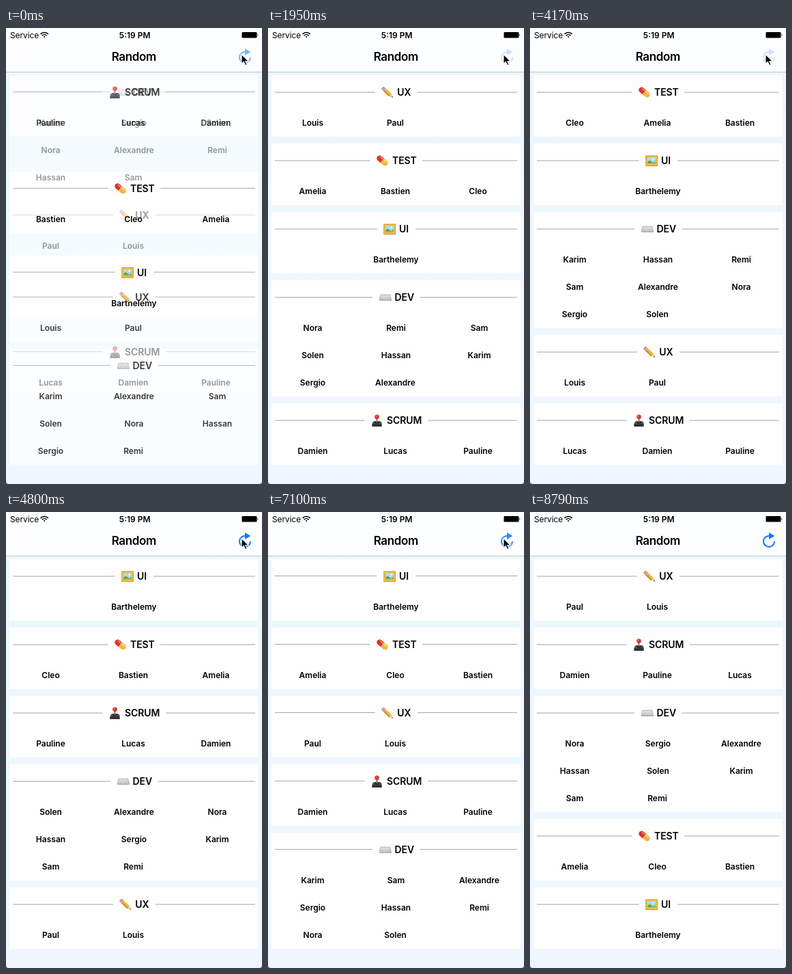
Write an HTML page that moves like this. It is 375 px wide and 667 px high and loops after 8890 ms.

```html
<!DOCTYPE html>
<html lang="en">
<head>
<meta charset="utf-8">
<title>Random</title>
<style>
  html, body { margin: 0; width: 100%; height: 100%; overflow: hidden; background: #edf7fd; }
  svg { display: block; width: 375px; height: 667px; font-family: Inter, Roboto, sans-serif; font-weight: 600; }
  .name { font-size: 12px; text-anchor: middle; }
  .head { font-size: 14px; letter-spacing: -.1px; }
</style>
</head>
<body>
<svg viewBox="0 0 375 667">
  <defs>
    <linearGradient id="sky" x2="0" y2="1">
      <stop stop-color="#ebf7fc"/><stop offset="1" stop-color="#eff6ff"/>
    </linearGradient>
    <linearGradient id="keys" x2="0" y2="1">
      <stop stop-color="#d9d9d9"/><stop offset="1" stop-color="#a9a9a9"/>
    </linearGradient>
    <g id="icon-S">
      <path d="M2 12 4 10H13L15.5 12V18H1.5Z" fill="#4b4d50"/>
      <path d="M1.5 14H15.5V18H1.5Z" fill="#2f3134"/>
      <ellipse cx="8.5" cy="12" rx="3.4" ry="1.4" fill="#222"/>
      <path d="M8.5 4V12" stroke="#777" stroke-width="2"/>
      <circle cx="8.5" cy="3.7" r="3.3" fill="#d8342c"/>
      <circle cx="7.5" cy="2.7" r="1" fill="#f08a80"/>
      <circle cx="4" cy="12" r="1" fill="#d8342c"/>
    </g>
    <g id="icon-T" transform="rotate(40 8.5 9)">
      <path d="M8.5 4.8H3.2A4.2 4.2 0 0 0 3.2 13.2H8.5Z" fill="#d9362b"/>
      <path d="M8.5 4.8H13.8A4.2 4.2 0 0 1 13.8 13.2H8.5Z" fill="#f4b53c"/>
      <path d="M2.5 6.8H8" stroke="#f39a8c" stroke-width="1.4" stroke-linecap="round"/>
      <path d="M9.5 6.8H14" stroke="#fde39a" stroke-width="1.4" stroke-linecap="round"/>
    </g>
    <g id="icon-I">
      <rect x=".3" y="1.5" width="17.6" height="15.6" fill="#c98e22"/>
      <rect x="1.3" y="2.5" width="15.6" height="13.6" fill="#efc14d"/>
      <rect x="3.4" y="4.6" width="11.4" height="9.4" fill="#a9dcf2"/>
      <path d="M3.4 10.5Q6 7.5 9 10.4T14.8 9.6V14H3.4Z" fill="#5f9f45"/>
      <path d="M3.4 12.4 14.8 11.6V14H3.4Z" fill="#9fb95b"/>
      <circle cx="11.5" cy="6.6" r="1.2" fill="#fff"/>
    </g>
    <g id="icon-X" transform="translate(1.4 2.4) rotate(43)">
      <path d="M0-2.6H2.5V2.6H0Q-1.3 0 0-2.6Z" fill="#e58f8d"/>
      <path d="M2.3-2.6H4.4V2.6H2.3Z" fill="#a9adb0"/>
      <path d="M4.4-2.6H16V2.6H4.4Z" fill="#f2b635"/>
      <path d="M4.4.9H16V2.6H4.4Z" fill="#c98322"/>
      <path d="M16-2.6 21 0 16 2.6Z" fill="#efcf9e"/>
      <path d="M19-1 21.2 0 19 1Z" fill="#333"/>
    </g>
    <g id="icon-D">
      <path d="M2.5 5H16.3L18.3 13.5H.5Z" fill="url(#keys)" stroke="#a2a2a2" stroke-width=".6"/>
      <path d="M3.2 7H15.7M2.7 9H16.3M2.3 11.3H4.3M5.5 11.3H13M14.3 11.3H16.8" stroke="#f3f3f3" stroke-width="1.1" stroke-dasharray="1.6 .5"/>
    </g>
  </defs>
  <rect width="375" height="667" fill="url(#sky)"/>
  <g id="list"></g>
  <rect width="375" height="64" fill="#fbfdff"/>
  <rect y="64" width="375" height="1" fill="#c0c7cc"/>
  <text x="6" y="14.5" font-size="12" font-weight="400" letter-spacing="-.1">Service</text>
  <g fill="none" stroke="#000" stroke-width="1.7">
    <path d="M50.6 8.8A8 8 0 0 1 61.8 8.8M52.8 11.1A4.9 4.9 0 0 1 59.6 11.1"/>
    <path d="M56.2 14.2 54.7 12.6A2.2 2.2 0 0 1 57.7 12.6Z" fill="#000" stroke="none"/>
  </g>
  <text x="188.7" y="14.5" font-size="12" text-anchor="middle">5:19 PM</text>
  <rect x="345.5" y="6" width="22" height="8.6" rx="1.4"/>
  <path d="M368.5 8.6Q370.3 10.3 368.5 12Z"/>
  <text x="187.3" y="48.2" font-size="17" letter-spacing="-.4" text-anchor="middle">Random</text>
  <g id="reload">
    <path d="M351 35A8 8 0 1 0 358 43" fill="none" stroke="#097aff" stroke-width="2"/>
    <path d="M350 30 358.3 35 350 40Z" fill="#097aff"/>
  </g>
  <path id="cursor" d="M0 0V14L3.3 11 5.7 16.2 8.1 15.1 5.8 10.2H10.2Z" stroke="#fff" stroke-width="1.1"/>
  <path id="corners" d="M0 663Q.5 666.5 4 667H0ZM375 663Q374.5 666.5 371 667H375Z" fill="#777"/>
</svg>
<script>
const LOOP = 8890, TICKS = 100, MOVE = 3.4;

const sections = {
  S: { title: 'SCRUM', width: 51, names: ['Pauline', 'Lucas', 'Damien'] },
  T: { title: 'TEST', width: 35, names: ['Amelia', 'Cleo', 'Bastien'] },
  X: { title: 'UX', width: 20.5, names: ['Paul', 'Louis'] },
  I: { title: 'UI', width: 15, names: ['Barthelemy'] },
  D: { title: 'DEV', width: 28, names: ['Solen', 'Hassan', 'Nora', 'Remi', 'Alexandre', 'Sam', 'Sergio', 'Karim'] }
};

// Section letter followed by the order of its names.
const layouts = [
  'D76024315 X01 T210 S120 I0',
  'S012 T210 I0 X10 D74502163',
  'X10 T021 I0 D23501764 S210',
  'T012 D01234567 X01 S021 I0',
  'T102 I0 D71354260 X10 S120',
  'I0 T120 S012 D04216753 X01',
  'X10 S102 T102 D45023617 I0',
  'I0 T012 X01 S210 D75461320',
  'X01 S201 D26410753 T012 I0'
].map(layOut);

// Ticks at which each shuffle is pressed, begins to move and has settled.
const shuffles = [
  { press: -4, begin: -2.35, first: 0, end: 3 },
  { press: 10, first: 11, end: 15 },
  { press: 22, first: 24, end: 27 },
  { press: 35, first: 37, end: 41 },
  { press: 47, first: 49, end: 54 },
  { press: 61, first: 63, end: 66 },
  { press: 73, first: 75, end: 80 },
  { press: 86, first: 87, end: 91 }
].map(s => ({ begin: s.first - .46, ...s }));

function layOut(text) {
  let top = 69;
  return text.split(' ').map(([key, ...order]) => {
    const height = 50 + 40 * Math.ceil(order.length / 3);
    const cells = order.map((id, i) => {
      const col = i % 3, row = Math.floor(i / 3);
      const pitch = key === 'D' && row < 2 ? 122 : 121;
      return { key: id, x: key === 'I' ? 187.5 : 65.5 + col * pitch, y: top + 70 + row * 40 };
    });
    const section = { key, top, height, cells };
    top += height + 10;
    return section;
  });
}

function common(a, b) {
  if (!a.length || !b.length) return [];
  if (a[0] === b[0]) return [a[0], ...common(a.slice(1), b.slice(1))];
  const skipA = common(a.slice(1), b), skipB = common(a, b.slice(1));
  return skipA.length >= skipB.length ? skipA : skipB;
}

const keys = list => list.map(item => item.key);
const find = (list, key) => list.find(item => item.key === key);
const mix = (a, b, p) => a + (b - a) * p;
const clamp = v => Math.max(0, Math.min(1, v));
const ease = v => v * v * (3 - 2 * v);

const card = (s, top, alpha) =>
  `<rect x="5" y="${top}" width="365" height="${s.height}" rx="2" fill="#fefefe" opacity="${alpha}"/>`;

function header(s, top, alpha, moving) {
  const { title, width } = sections[s.key];
  const y = top + 25, left = 188 - (width + 23) / 2, gap = width / 2 + 20.8;
  const line = moving ? 'stroke="#a6a8a9" stroke-width="1"' : 'stroke="#cfd0d1" stroke-width="2"';
  return `<g opacity="${alpha}">
    <path d="M10 ${y}H${187.8 - gap}M${187.8 + gap} ${y}H365" ${line} transform="translate(0 ${moving ? -.5 : 0})"/>
    <use href="#icon-${s.key}" x="0" y="0" transform="translate(${left} ${y - 9})"/>
    <text class="head" x="${left + 23}" y="${y + 5}">${title}</text></g>`;
}

const cell = (s, c, x, y, alpha) =>
  `<text class="name" x="${x}" y="${y + 4.4}" opacity="${alpha}">${sections[s.key].names[c.key]}</text>`;

function drawList(from, to, p, moving) {
  const fadeOut = 1 - p * p, kept = common(keys(to), keys(from));
  let cards = '', content = '';
  const whole = (s, alpha) => {
    cards += card(s, s.top, alpha);
    content += header(s, s.top, alpha, moving) + s.cells.map(c => cell(s, c, c.x, c.y, alpha)).join('');
  };
  if (p < 1) from.filter(s => !kept.includes(s.key)).forEach(s => whole(s, fadeOut));
  for (const s of to) {
    if (!kept.includes(s.key)) { whole(s, p); continue; }
    const old = find(from, s.key), top = mix(old.top, s.top, p);
    const stay = common(keys(old.cells), keys(s.cells));
    cards += card(s, top, 1);
    content += header(s, top, 1, moving);
    for (const c of s.cells) {
      const o = find(old.cells, c.key);
      if (stay.includes(c.key)) content += cell(s, c, mix(o.x, c.x, p), mix(o.y, c.y, p), 1);
      else content += (p < 1 ? cell(s, o, o.x, o.y, fadeOut) : '') + cell(s, c, c.x, c.y, p);
    }
  }
  list.innerHTML = cards + content;
}

const [list, reload, cursor, corners] =
  ['list', 'reload', 'cursor', 'corners'].map(id => document.getElementById(id));

function buttonAlpha(tick) {
  const s = shuffles.filter(s => s.press <= tick).pop();
  return tick < s.first ? .2 : mix(.2, 1, clamp((tick - s.begin) / (s.end - s.begin)));
}

function render(tick) {
  const index = shuffles.filter(s => s.first <= tick).length - 1;
  const s = shuffles[index];
  const p = tick >= s.end ? 1 : ease(clamp((tick - s.begin) / MOVE));
  drawList(layouts[index], layouts[index + 1], p, tick < s.end);
  reload.setAttribute('opacity', buttonAlpha(tick));
  const leaving = tick === 93;
  cursor.setAttribute('visibility', tick < 90 || leaving ? 'visible' : 'hidden');
  cursor.setAttribute('transform', leaving ? 'translate(373.5 660.5)' : 'translate(345 38.5)');
  corners.setAttribute('visibility', tick < 99 ? 'visible' : 'hidden');
}

// Ticks start on whole hundredths of a second.
const tickAt = ms => Math.ceil((Math.floor(ms / 10) + 1) * 10 * TICKS / LOOP) - 1;

const start = performance.now();
let shown = -1;
function play(now) {
  const tick = Math.min(TICKS - 1, tickAt(Math.max(0, now - start) % LOOP));
  if (tick !== shown) render(shown = tick);
  requestAnimationFrame(play);
}
play(start);
</script>
</body>
</html>
```
